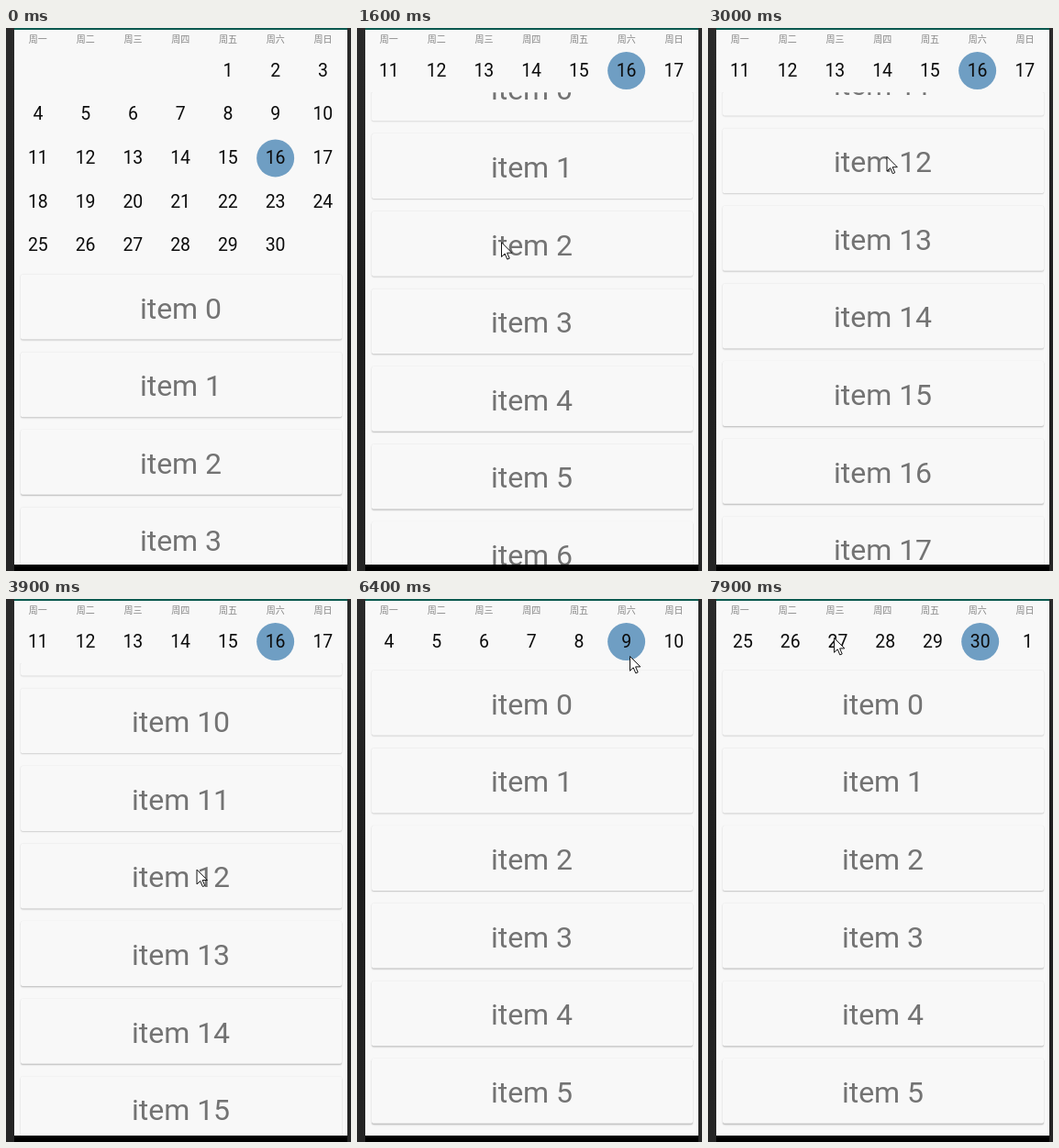
These frames come from a looping animation (376 px wide and 592 px high, 8000 ms). An HTML page:

```html
<!DOCTYPE html>
<html lang="zh-CN">
<head>
<meta charset="utf-8">
<title>Calendar</title>
<style>
  html, body { margin: 0; width: 100%; height: 100%; overflow: hidden; background: #222; }
  #stage { position: relative; width: 376px; height: 592px; overflow: hidden;
    background: linear-gradient(#2a2a2a, #1d1d1d 50%, #252525); }
  #stage div { position: absolute; box-sizing: border-box; }
  #phone { left: 9px; top: 0; width: 363px; height: 592px; background: #000; }
  #app { left: 0; top: 0; width: 363px; height: 585px; overflow: hidden;
    background: #f8f8f8; border-top: 2px solid #0b594f;
    font-family: Roboto, "Noto Sans CJK SC", "Noto Sans CJK", sans-serif; }
  #view { left: 0; top: 19px; width: 363px; height: 564px; overflow: hidden; }
  #month, #weeks { left: 0; top: 0; width: 363px; height: 50px; }
  .cell { width: 60px; height: 30px; line-height: 30px; text-align: center; white-space: nowrap; }
  .name { font-size: 10px; color: #858585; }
  .day { font-size: 19.4px; color: #0c0c0c; }
  .dot { width: 41px; height: 41px; border-radius: 50%; background: #6f9ec3; }
  #list { left: 0; top: 0; width: 363px; height: 800px; overflow: hidden; background: #f8f8f8; }
  .card { left: 6.5px; top: 0; width: 350px; height: 70.6px; border-radius: 2px; background: #f8f8f8;
    font-size: 32px; line-height: 74px; text-align: center; color: #737373; }
  #cursor { position: absolute; left: 0; top: 0; overflow: visible; }
</style>
</head>
<body>
<div id="stage">
  <div id="phone">
    <div id="app">
      <div id="names"></div>
      <div id="view">
        <div id="month"></div>
        <div id="weeks"></div>
        <div id="list"></div>
      </div>
    </div>
  </div>
  <svg id="cursor" width="14" height="22">
    <path d="M.5 .5V16.3L4.2 12.8L6.8 18.9L9.2 17.9L6.6 11.9H11.8Z" fill="#fff" stroke="#111"/>
  </svg>
</div>
<script>
const LOOP = 8000, STEP = 100;
const WIDTH = 363, COL = 51.75, ROW = 47.7, FIRST_ROW = 25.5;
const PITCH = 84.6, FOLD = 4 * ROW, LIST_TOP = 240;
const SWING = 127, REST_Y = 87;

// Vertical drags: the first folds the month, the others scroll the list by dist.
// y is where the cursor takes hold.
const DRAGS = [
  { start: 600, len: 830, dist: 0, y: 236 },
  { start: 1430, len: 900, dist: 506, y: 277 },
  { start: 2330, len: 900, dist: 570.5, y: 234 },
  { start: 3350, len: 850, dist: -350, y: 200 },
  { start: 4200, len: 800, dist: -343, y: 190 },
  { start: 5000, len: 750, dist: -383.5, y: 181 }
];
// Sideways: one quick swipe back, then three forward at an even pace.
const BACK = 6050, BACK_LEN = 350, FORWARD = 6450, PACE = 580, SNAP = 364;

const $ = id => document.getElementById(id);
const mix = (a, b, u) => a + (b - a) * u;
const progress = (t, start, len) => Math.min(1, Math.max(0, (t - start) / len));
const smooth = u => u * u * (3 - 2 * u);
const easeOut = u => 1 - (1 - u) ** 3;
const pulse = u => Math.sin(Math.PI * u) ** 2;

const foldAt = t => FOLD * smooth(progress(t, 600, 550));
const scrollAt = t => DRAGS.reduce((sum, d) => sum + d.dist * smooth(progress(t, d.start, d.len)), 0);
const pageAt = t => [0, 1, 2].reduce(
  (sum, i) => sum + easeOut(progress(t, FORWARD + i * PACE, SNAP)),
  -smooth(progress(t, BACK, BACK_LEN)));

function cursorAt(t) {
  if (t < 600) {
    const u = smooth(progress(t, 100, 400));
    return [mix(269, 157, u), mix(488, 236, u)];
  }
  if (t < BACK) {
    const i = DRAGS.findLastIndex(d => d.start <= t), drag = DRAGS[i];
    const u = progress(t, drag.start, drag.len);
    const nextY = i + 1 < DRAGS.length ? DRAGS[i + 1].y : REST_Y;
    const dir = drag.dist < 0 ? 1 : -1;
    return [157 + 65 * progress(t, 1600, 3500) ** .6,
      mix(drag.y, nextY, smooth(u)) + dir * SWING * pulse(u)];
  }
  if (t < FORWARD) {
    const u = smooth(progress(t, BACK, BACK_LEN));
    return [mix(222, 297, u), mix(REST_Y, 62, u)];
  }
  return [297 - 160 * pulse((t - FORWARD) / PACE), mix(62, 42, progress(t, FORWARD, 1450))];
}

function add(parent, cls, text = '') {
  const el = document.createElement('div');
  el.className = cls;
  el.textContent = text;
  parent.append(el);
  return el;
}

function place(el, x, y) {
  el.style.transform = `translate(${x.toFixed(2)}px, ${y.toFixed(2)}px)`;
}

function addCell(parent, cls, text, col, y, page = 0) {
  place(add(parent, 'cell ' + cls, text), page * WIDTH + COL * (col + .5) - 30, y - 15);
}

function addDay(parent, n, col, y, selected, page = 0) {
  if (selected) place(add(parent, 'dot'), page * WIDTH + COL * (col + .5) - 20.5, y - 20.5);
  addCell(parent, 'day', n, col, y, page);
}

[...'一二三四五六日'].forEach((c, i) => addCell($('names'), 'name', '周' + c, i, 11.4));

for (let n = 1; n <= 30; n++) {
  const slot = n + 3;
  addDay($('month'), n, slot % 7, FIRST_ROW + ROW * Math.floor(slot / 7), n === 16);
}
for (let p = -1; p <= 2; p++) {
  for (let c = 0; c < 7; c++) {
    addDay($('weeks'), (10 + p * 7 + c) % 30 + 1, c, FIRST_ROW, c === 5, p);
  }
}
const cards = Array.from({ length: 8 }, () => add($('list'), 'card'));

function draw(t) {
  const fold = foldAt(t), scroll = scrollAt(t), top = LIST_TOP - fold;
  const inWeek = fold >= FOLD;
  $('month').style.display = inWeek ? 'none' : '';
  $('weeks').style.display = inWeek ? '' : 'none';
  place($('month'), 0, -Math.min(fold, 2 * ROW));
  place($('weeks'), -pageAt(t) * WIDTH, 0);
  place($('list'), 0, top);

  // Shadows deepen towards the bottom of the screen.
  const first = Math.max(0, Math.floor(scroll / PITCH));
  cards.forEach((card, i) => {
    const y = 7.6 + (first + i) * PITCH - scroll;
    const depth = Math.max(0, y + top) / 560;
    card.textContent = 'item ' + (first + i);
    card.style.boxShadow = `0 ${(.5 + depth).toFixed(2)}px 1.5px rgba(0,0,0,${(.17 + .08 * depth).toFixed(3)}),`
      + ' 0 0 1px rgba(0,0,0,.08)';
    place(card, 0, y);
  });

  $('cursor').style.display = t < 100 ? 'none' : '';
  place($('cursor'), ...cursorAt(t));
}

const start = performance.now();
let shown = -1;
function tick() {
  // Small lead so a late display frame still lands on its step.
  const t = Math.floor((performance.now() - start + 20) / STEP) * STEP % LOOP;
  if (t !== shown) draw(shown = t);
  requestAnimationFrame(tick);
}
tick();
</script>
</body>
</html>
```
